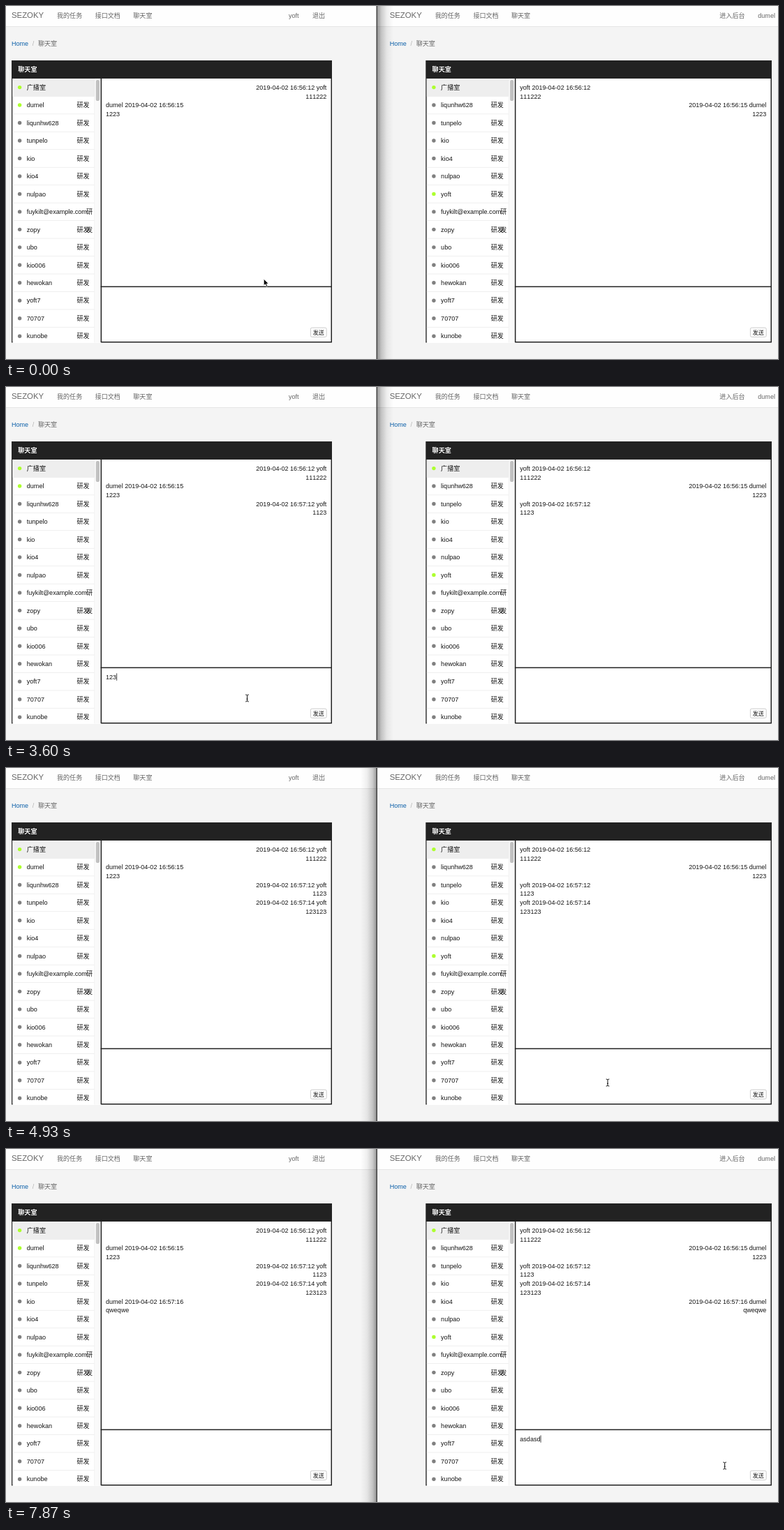
An HTML page for the animation above (8 s loop, 1106 by 506 pixels).

```html
<!DOCTYPE html>
<html lang="zh-CN">
<head>
<meta charset="utf-8">
<title>聊天室</title>
<style>
  html, body { margin: 0; width: 100%; height: 100%; overflow: hidden; background: #f4f4f4; }
  svg { display: block; width: 1106px; height: 506px; }
  text {
    font: 9.05px "Liberation Sans", "Noto Sans CJK SC", "Noto Sans CJK", sans-serif;
    font-kerning: none; white-space: pre; fill: #161616;
  }
  .nav { fill: #666; }
  .brand { fill: #666; font-size: 11.35px; }
  .link { fill: #0f62aa; }
  .slash { fill: #b4b4b4; }
  .title { fill: #fff; font-weight: bold; }
  .small { font-size: 8px; }
</style>
</head>
<body>
<svg viewBox="0 0 1106 506">
  <defs>
    <linearGradient id="shade">
      <stop offset="0" stop-opacity=".4"/>
      <stop offset=".25" stop-opacity=".2"/>
      <stop offset=".6" stop-opacity=".06"/>
      <stop offset="1" stop-opacity="0"/>
    </linearGradient>
  </defs>
  <g id="base"></g>
  <g id="live"></g>
</svg>
<script>
const LOOP = 8000, INK = '#222', ROW = 25.47;
const $ = id => document.getElementById(id);
const rect = (x, y, w, h, fill, extra = '') =>
  `<rect x="${x}" y="${y}" width="${w}" height="${h}" fill="${fill}" ${extra}/>`;
// y is the middle of the line
const text = (x, y, s, cls = '', anchor = 'start') =>
  `<text x="${x}" y="${y + 3.2}" class="${cls}" text-anchor="${anchor}">${s}</text>`;

const others = ['liqunhw628', 'tunpelo', 'kio', 'kio4', 'nulpao'];
const rest = ['fuykilt@example.com', 'zopy', 'ubo', 'kio006', 'hewokan', 'yoft7', '70707', 'kunobe'];
const panels = [
  { user: 'yoft', peer: 'dumel', x: 8, right: 467, list: ['dumel', ...others, ...rest] },
  { user: 'dumel', peer: 'yoft', x: 601.3, right: 1097, list: [...others, 'yoft', ...rest] }
];
const messages = [
  ['yoft', '16:56:12', '111222'],
  ['dumel', '16:56:15', '1223'],
  ['yoft', '16:57:12', '1123'],
  ['yoft', '16:57:14', '123123'],
  ['dumel', '16:57:16', 'qweqwe']
];

function page(x, menu) {
  return text(x + 8, 13.8, 'SEZOKY', 'brand')
    + [['我的任务', 73], ['接口文档', 127.7], ['聊天室', 182.3]]
      .map(([s, dx]) => text(x + dx, 13.5, s, 'nav')).join('')
    + menu.map(([s, mx]) => text(mx, 13.5, s, 'nav')).join('')
    + text(x + 8, 54.2, 'Home', 'link') + text(x + 37.7, 54.2, '/', 'slash')
    + text(x + 46, 54.2, '聊天室', 'nav');
}

function panel({ peer, x, right, list }) {
  let out = rect(x, 78, right - x, 404.5, INK)
    + rect(x + 1.5, 104, right - x - 3, 377, '#fff')
    + text(x + 9.3, 91.2, '聊天室', 'title')
    + rect(x + 1.5, 104, 126.3, 379, '#fff')
    + rect(x + 1.5, 104, 117.4, 25.2, '#eee')
    + rect(x + 118.6, 104, .7, 378.5, '#e4e4e4')
    + rect(x + 119.3, 104, 8.4, 378.5, '#fafafa')
    + rect(x + 120.8, 106, 5.2, 30, '#c1c1c1', 'rx="2.6"')
    + rect(x + 127.6, 104, 1.5, 378, INK)
    + rect(x + 127.6, 401.6, right - x - 127.6, 1.5, INK);
  ['广播室', ...list].forEach((name, i) => {
    const y = 116.6 + ROW * i, on = !i || name === peer;
    out += `<circle cx="${x + 11.6}" cy="${y}" r="2.7" fill="${on ? '#adff2f' : '#808080'}"/>`
      + text(x + 21.8, y, name);
    if (i < 14) out += rect(x + 1.5, y + 12.4, 117, .7, '#e8e8e8');
    if (name.includes('@'))
      out += text(x + 107, y, '研') + text(x + 107, y + ROW, '发');
    else if (i) out += text(x + 93.5, y, '研发');
  });
  return out;
}

$('base').innerHTML = rect(0, 0, 1106, 29, '#fefefe') + rect(0, 29, 1106, .8, '#e2e2e2')
  + page(0, [['yoft', 405], ['退出', 439]])
  + page(541.7, [['进入后台', 1022.3], ['dumel', 1077.3]])
  + panels.map(panel).join('');

// [time, pointer x, pointer y, changes]; draft is [panel, typed], btn is [left, right]: 1 hover, 2 focus
const steps = [
  [0, 369.3, 391.3, { cur: 'arrow', draft: null, sent: 2, btn: [0, 0], front: 0 }],
  [600, 366, 408, { cur: 'beam' }],
  [750, 359, 424],
  [900, 352, 436],
  [1050, 350, 439, { draft: [0, ''] }],
  [1390, 349, 440],
  [1540, 349, 440, { draft: [0, '1'] }],
  [1680, 349, 440, { draft: [0, '11'] }],
  [1830, 349, 440, { draft: [0, '1123'] }],
  [1980, 386, 450],
  [2120, 428, 466],
  [2270, 448, 470, { cur: 'hand', btn: [1, 0] }],
  [2570, 448, 470, { draft: null, sent: 3, btn: [2, 0] }],
  [2720, 418, 463, { cur: 'beam' }],
  [2860, 365, 449],
  [3010, 345.5, 446, { draft: [0, ''], btn: [0, 0] }],
  [3460, 345.5, 446, { draft: [0, '1'] }],
  [3600, 345.5, 446, { draft: [0, '123'] }],
  [3750, 345.5, 446, { draft: [0, '12312'] }],
  [3890, 345.5, 446, { draft: [0, '123123'] }],
  [4040, 390, 455],
  [4190, 446, 467, { cur: 'hand', btn: [1, 0] }],
  [4340, 446, 467, { draft: null, sent: 4, btn: [2, 0] }],
  [4630, 640, 464, { cur: 'arrow' }],
  [4780, 881, 455.3],
  [4930, 862, 451, { cur: 'beam', btn: [0, 0], front: 1 }],
  [5080, 862, 451, { draft: [1, ''] }],
  [5230, 862, 451, { draft: [1, 'q'] }],
  [5380, 862, 451, { draft: [1, 'qw'] }],
  [5520, 862, 451, { draft: [1, 'qwe'] }],
  [5670, 862, 451, { draft: [1, 'qweq'] }],
  [5820, 862, 451, { draft: [1, 'qweqwe'] }],
  [5970, 930, 456],
  [6110, 1020, 464],
  [6260, 1079, 469, { cur: 'hand', btn: [0, 1] }],
  [6400, 1079, 469, { draft: null, sent: 5, btn: [0, 2] }],
  [6550, 1030, 461, { cur: 'beam' }],
  [6700, 958, 453],
  [6850, 944, 451],
  [6990, 944, 451, { draft: [1, ''], btn: [0, 0] }],
  [7430, 944, 451, { draft: [1, 'a'] }],
  [7580, 965, 452, { draft: [1, 'asd'] }],
  [7720, 1010, 454, { draft: [1, 'asdas'] }],
  [7870, 1029.7, 454, { draft: [1, 'asdasd'] }]
];
let last = {};
const states = steps.map(([t, x, y, change]) => last = { ...last, t, x, y, ...change });

const pointers = {
  arrow: '<path d="M0 0V9.4L2.2 7.4 3.8 11 5.4 10.3 3.9 6.8H6.8Z" stroke="#fff" stroke-width=".7"/>',
  beam: '<path d="M-2.3-5Q-.3-5 0-4 .3-5 2.3-5M0-4V4M-2.3 5Q-.3 5 0 4 .3 5 2.3 5M-1 1.2H1" fill="none" stroke="#111"/>',
  hand: '<path d="M-1 5.5V.8a.9.9 0 0 1 1.8 0V4l4 .9q1 .3.8 1.6l-.8 3.8h-5L-4 6.8q-.6-1.4 1-1Z" fill="#fff" stroke="#111" stroke-width=".9"/>'
};
const buttonLook = [['#fff', '#ccc', 1], ['#e2e2e2', '#aaa', 1], ['#dfdfdf', '#999', 1.6]];

function button(right, mode) {
  const [fill, stroke, width] = buttonLook[mode];
  return rect(right - 30.6, 461.2, 22.8, 13.2, fill, `rx="2" stroke="${stroke}" stroke-width="${width}"`)
    + text(right - 19.2, 467.6, '发送', 'small', 'middle');
}

function chat({ user, x, right }, count) {
  return messages.slice(0, count).map(([who, time, body], i) => {
    const y = 116.6 + ROW * i, mine = who === user, stamp = '2019-04-02 ' + time;
    const tx = mine ? right - 7.6 : x + 135, anchor = mine ? 'end' : 'start';
    return text(tx, y, mine ? `${stamp} ${who}` : `${who} ${stamp}`, '', anchor)
      + text(tx, y + 12.7, body, '', anchor);
  }).join('');
}

function draw(s) {
  const shadow = s.front
    ? rect(0, 0, 23, 506, 'url(#shade)', 'transform="translate(531 0) scale(-1 1)"')
    : rect(532, 0, 23, 506, 'url(#shade)');
  let out = shadow + rect(530.5, 0, 1.5, 506, '#444')
    + panels.map((p, i) => chat(p, s.sent) + button(p.right, s.btn[i])).join('');
  if (s.draft) {
    const [i, typed] = s.draft, x = panels[i].x + 135;
    out += `<g id="draft">${text(x, 415.6, typed)}</g>`;
    $('live').innerHTML = out;
    const end = x + (typed && $('draft').firstChild.getComputedTextLength());
    out += rect(end + .2, 410.4, .8, 10.4, '#222');
  }
  $('live').innerHTML = out + `<g transform="translate(${s.x} ${s.y})">${pointers[s.cur]}</g>`;
}

let shown;
function tick() {
  const t = performance.now() % LOOP;
  const state = states.findLast(s => s.t <= t);
  if (state !== shown) draw(shown = state);
  requestAnimationFrame(tick);
}
tick();
</script>
</body>
</html>
```
